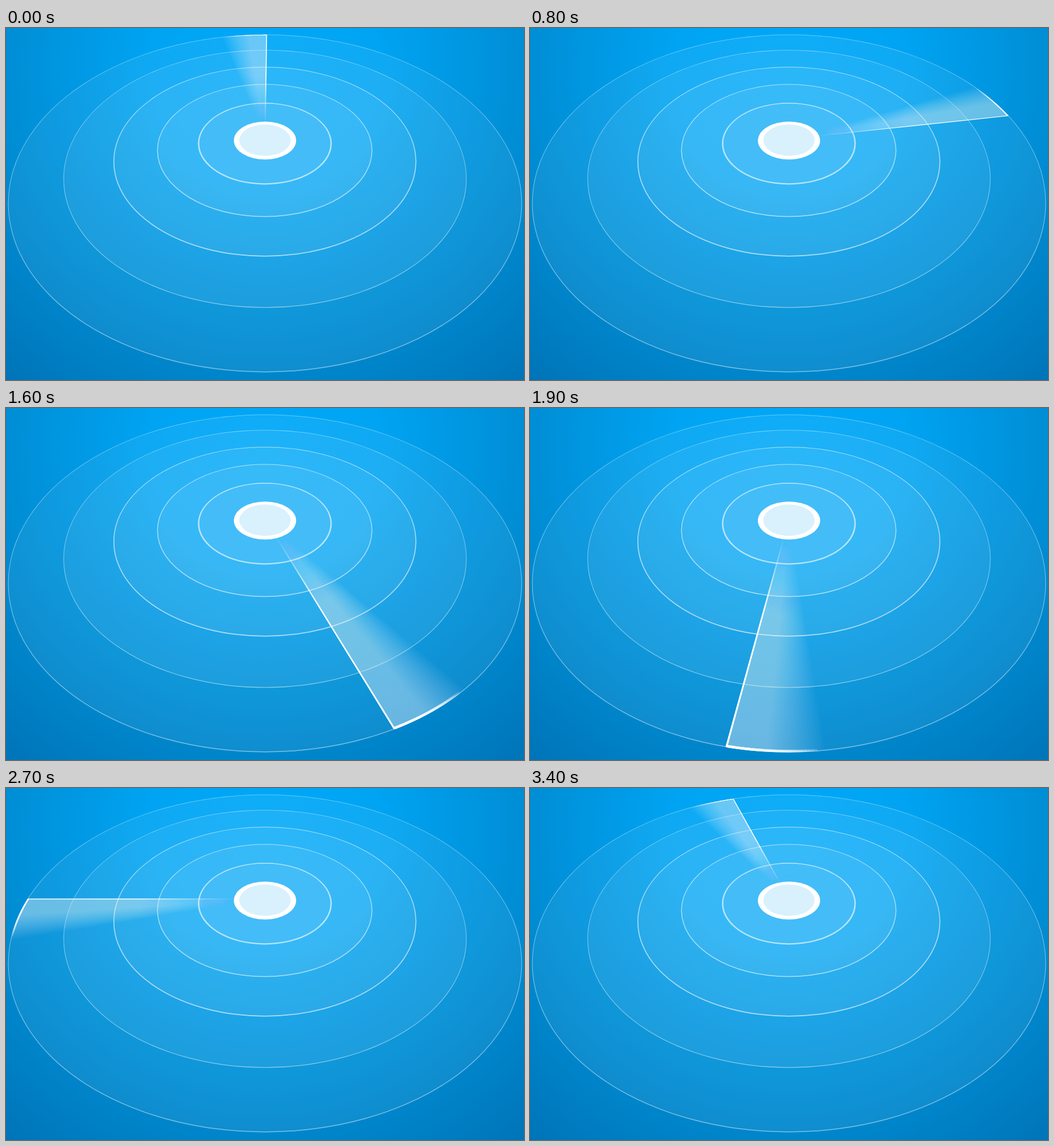
These frames come from a looping animation (907x617 px, 3500 ms). An HTML page:

```html
<!DOCTYPE html>
<html lang="en">
<head>
<meta charset="utf-8">
<title>Radar sweep</title>
<style>
  html, body { margin: 0; width: 100%; height: 100%; overflow: hidden; background: #0090d8; }
  svg { display: block; width: 907px; height: 617px; }
</style>
</head>
<body>
<svg viewBox="0 0 907 617">
  <defs>
    <radialGradient id="sky" gradientUnits="userSpaceOnUse" cx="453.5" cy="70" r="720">
      <stop offset="0" stop-color="rgb(0,168,248)"/>
      <stop offset=".28" stop-color="rgb(0,164,242)"/>
      <stop offset=".43" stop-color="rgb(0,154,230)"/>
      <stop offset=".55" stop-color="rgb(0,147,220)"/>
      <stop offset=".69" stop-color="rgb(0,138,208)"/>
      <stop offset="1" stop-color="rgb(0,115,183)"/>
    </radialGradient>
    <linearGradient id="fade" gradientUnits="userSpaceOnUse">
      <stop offset="0" stop-color="#fff" stop-opacity="0"/>
      <stop offset="1" stop-color="#fff"/>
    </linearGradient>
  </defs>
  <rect width="907" height="617" fill="url(#sky)"/>
  <g id="rings" fill="#fff"></g>
  <g id="sweep" fill="url(#fade)"></g>
  <ellipse cx="453.5" cy="197.2" rx="54.5" ry="33.3" fill="#fff"/>
  <ellipse cx="453.5" cy="196.7" rx="45" ry="27.5" fill="#d9f1fc"/>
</svg>
<script>
const LOOP = 3500, STEP = 100, LAYERS = 20;
const disc = { cx: 453.5, cy: 307.5, rx: 449.5, ry: 295.5 };
const TILT = 0.3824; // offset of the projected centre, in disc radii
const SQUEEZE = Math.sqrt(1 - TILT * TILT);
const rad = deg => deg * Math.PI / 180;

function add(parent, tag, attrs) {
  const el = document.createElementNS('http://www.w3.org/2000/svg', tag);
  for (const key in attrs) el.setAttribute(key, attrs[key]);
  return parent.appendChild(el);
}

// Perspective view of a point on the unit disc; 0 degrees points away, clockwise.
function project(u, v) {
  const depth = 1 - TILT * v;
  return [disc.cx + disc.rx * u * SQUEEZE / depth, disc.cy + disc.ry * (v - TILT) / depth];
}
const polar = (r, deg) => project(r * Math.sin(rad(deg)), -r * Math.cos(rad(deg)));
const polygon = points => 'M' + points.map(p => p.map(n => n.toFixed(2)).join()).join('L') + 'Z';

function arc(r, from, to) {
  const count = 16;
  return Array.from({ length: count + 1 }, (_, i) => polar(r, from + (to - from) * i / count));
}

function ellipse(cx, cy, rx, ry) {
  return `M${cx - rx},${cy}a${rx},${ry} 0 1 1 ${2 * rx},0a${rx},${ry} 0 1 1 ${-2 * rx},0Z`;
}

// Left, right, top and bottom edges; line width at top, side and bottom; line opacity.
const rings = [
  [3.5, 903.5, 11.5, 603.5, 0.8, 1.1, 1.5, 0.45],
  [100.5, 806.5, 38.5, 490.5, 0.8, 1, 1.3, 0.45],
  [188, 718.5, 68, 400.8, 1, 1.6, 1.8, 0.6],
  [264.5, 641.5, 98.3, 331.3, 1, 1.4, 1.5, 0.58],
  [336, 570.5, 131, 274.5, 1.4, 2.5, 2.3, 0.62]
];
const ringGroup = document.getElementById('rings');
for (const [left, right, top, bottom, wTop, wSide, wBottom, opacity] of rings) {
  const cx = (left + right) / 2, cy = (top + bottom) / 2;
  const rx = (right - left) / 2, ry = (bottom - top) / 2;
  const outer = ellipse(cx, cy, rx, ry);
  const inner = ellipse(cx, cy + (wTop - wBottom) / 2, rx - wSide, ry - (wTop + wBottom) / 2);
  add(ringGroup, 'path', { d: outer, 'fill-opacity': 0.06 });
  add(ringGroup, 'path', { d: outer + inner, 'fill-rule': 'evenodd', 'fill-opacity': opacity });
}

// Nested translucent wedges build up a smooth trail without seams.
const sweep = document.getElementById('sweep');
const layerOpacity = total => 1 - Math.pow(1 - total, 1 / LAYERS);
const stack = (total, fill) => Array.from({ length: LAYERS }, () =>
  add(sweep, 'path', { 'fill-opacity': layerOpacity(total), fill }));
const wedges = stack(0.4, 'url(#fade)');
const rims = stack(0.96, '#fff');
const beam = add(sweep, 'path', {});
const fade = document.getElementById('fade');

function leadAngle(step) {
  const base = step * 10;
  return base + 0.55 * Math.cos(rad(base)) + 0.2 * Math.max(0, step - 30);
}

function draw(time) {
  const lead = leadAngle(Math.floor(time % LOOP / STEP));
  const hub = project(0, 0);
  const [x1, y1] = polar(0.12, lead), [x2, y2] = polar(0.52, lead);
  for (const [key, value] of Object.entries({ x1, y1, x2, y2 })) fade.setAttribute(key, value);

  for (let i = 0; i < LAYERS; i++) {
    const k = (i + 0.5) / LAYERS;
    const wedgeStart = lead - 6 - 9 * k;
    const rimStart = lead - 3 - 11 * k;
    wedges[i].setAttribute('d', polygon([hub, ...arc(1, wedgeStart, lead)]));
    rims[i].setAttribute('d', polygon([...arc(1.001, rimStart, lead), ...arc(0.9945, lead, rimStart)]));
  }

  const half = 0.0025, sin = Math.sin(rad(lead)), cos = Math.cos(rad(lead));
  const side = (r, s) => project(r * sin + s * cos, -r * cos + s * sin);
  beam.setAttribute('d', polygon([side(0, -half), side(1, -half), side(1, half), side(0, half)]));
}

const start = performance.now();
function tick() {
  draw(performance.now() - start);
  requestAnimationFrame(tick);
}
tick();
</script>
</body>
</html>
```
